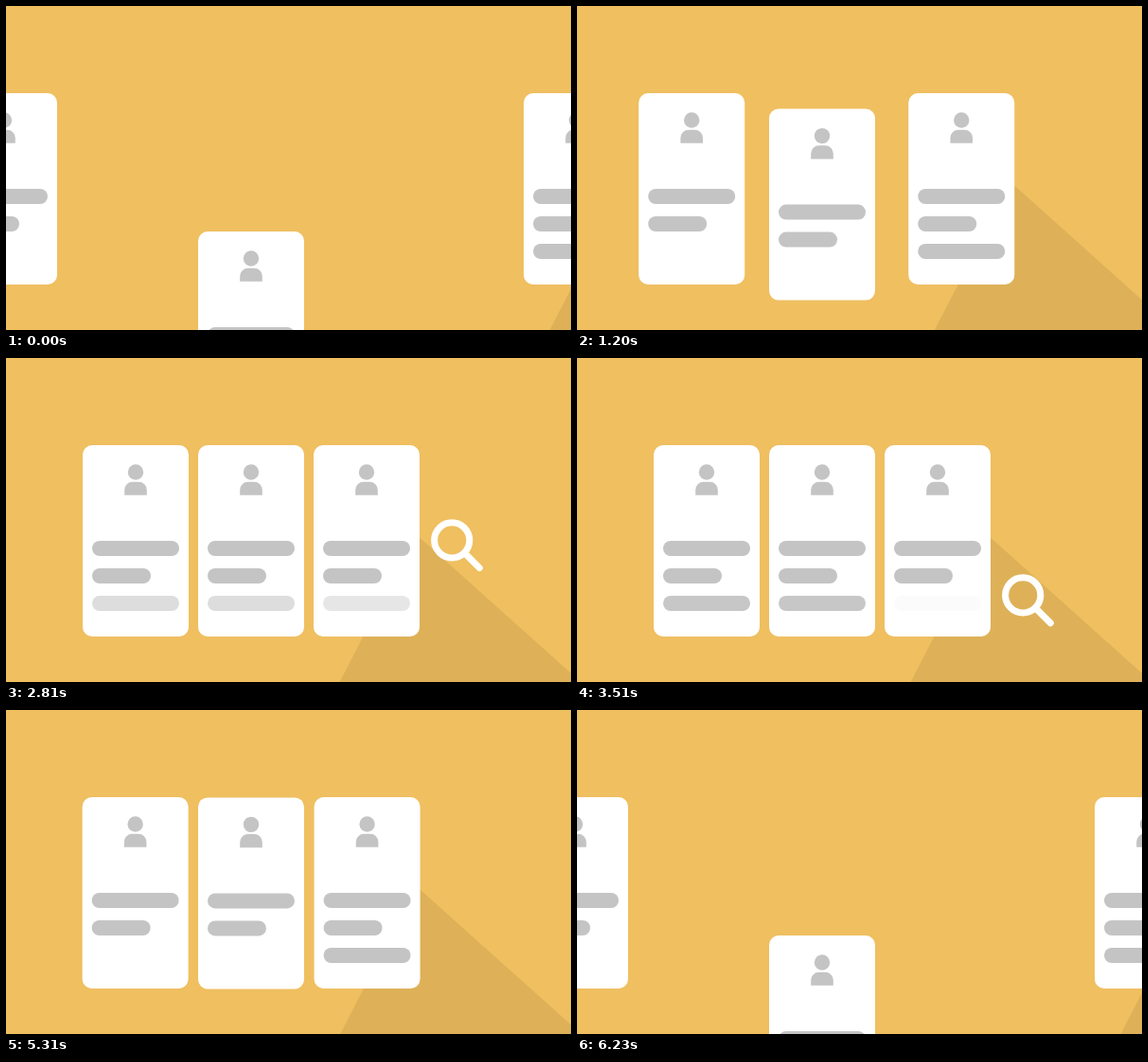
An HTML page that plays this animation: 597x342 px, repeating every 6.39 s.

```html
<!DOCTYPE html>
<html lang="en">
<head>
<meta charset="utf-8">
<title>Sorting cards</title>
<style>
  html, body { margin: 0; width: 100%; height: 100%; overflow: hidden; background: #efbf60; }
  svg { display: block; width: 597px; height: 342px; }
</style>
</head>
<body>
<svg viewBox="0 0 597 342">
  <defs>
    <g id="card">
      <rect width="112" height="202" rx="10" fill="#fff"/>
      <g fill="#c4c4c4">
        <circle cx="56" cy="28.5" r="8.2"/>
        <path d="M44.2 52.8v-5.6a8.5 8.5 0 0 1 8.5-8.5h6.6a8.5 8.5 0 0 1 8.5 8.5v5.6z"/>
        <rect x="10" y="101" width="92" height="16" rx="8"/>
        <rect x="10" y="130" width="62" height="16" rx="8"/>
      </g>
    </g>
    <rect id="bar" x="10" y="159" width="92" height="16" rx="8" fill="#c4c4c4"/>
  </defs>
  <g id="left"><use href="#card"/><use class="extra" href="#bar"/></g>
  <g id="middle"><use href="#card"/><use class="extra" href="#bar"/></g>
  <g id="right">
    <path d="M108 94L500 445V600H295L6 292z" fill="#deb158"/>
    <use href="#card"/><use id="last" href="#bar"/>
  </g>
  <g id="lens" fill="none" stroke="#fff" stroke-width="7" stroke-linecap="round">
    <circle cx="22.2" cy="22" r="18.6"/>
    <path d="M37 37L51.3 51.3"/>
  </g>
</svg>
<script>
const LOOP = 6390, MOVE = 660;
const $ = id => document.getElementById(id);
const extras = document.querySelectorAll('.extra');

const linear = (t, start, length) => Math.min(1, Math.max(0, (t - start) / length));

// cubic-bezier(.25, .1, .25, 1)
function ease(t, start) {
  const x = linear(t, start, MOVE);
  if (x === 0 || x === 1) return x;
  const bezier = (s, a, b) => 3 * s * (1 - s) ** 2 * a + 3 * s * s * (1 - s) * b + s ** 3;
  let low = 0, high = 1;
  for (let i = 0; i < 24; i++) {
    const mid = (low + high) / 2;
    if (bezier(mid, .25, .25) < x) low = mid; else high = mid;
  }
  return bezier(low, .1, 1);
}

const place = (id, x, y) => $(id).setAttribute('transform', `translate(${x} ${y})`);
const fade = (node, opacity) => node.setAttribute('opacity', opacity);

function draw(now) {
  const t = now % LOOP;
  const away = 1 - ease(t, 804) + ease(t, 5307);
  const swap = ease(t, 2590) - ease(t, 3459);

  place('left', 81 - 139 * away, 92);
  place('middle', 203, 92 + 146 * away);
  place('right', 325 + 222 * away, 92);
  place('lens', 449, 76 + 163 * swap);

  extras.forEach(bar => fade(bar, swap));
  fade($('last'), 1 - swap);
  fade($('lens'), linear(t, 1660, 490) - linear(t, 4380, 475));
}

const begin = performance.now();
function tick() {
  draw(performance.now() - begin);
  requestAnimationFrame(tick);
}
tick();
</script>
</body>
</html>
```
